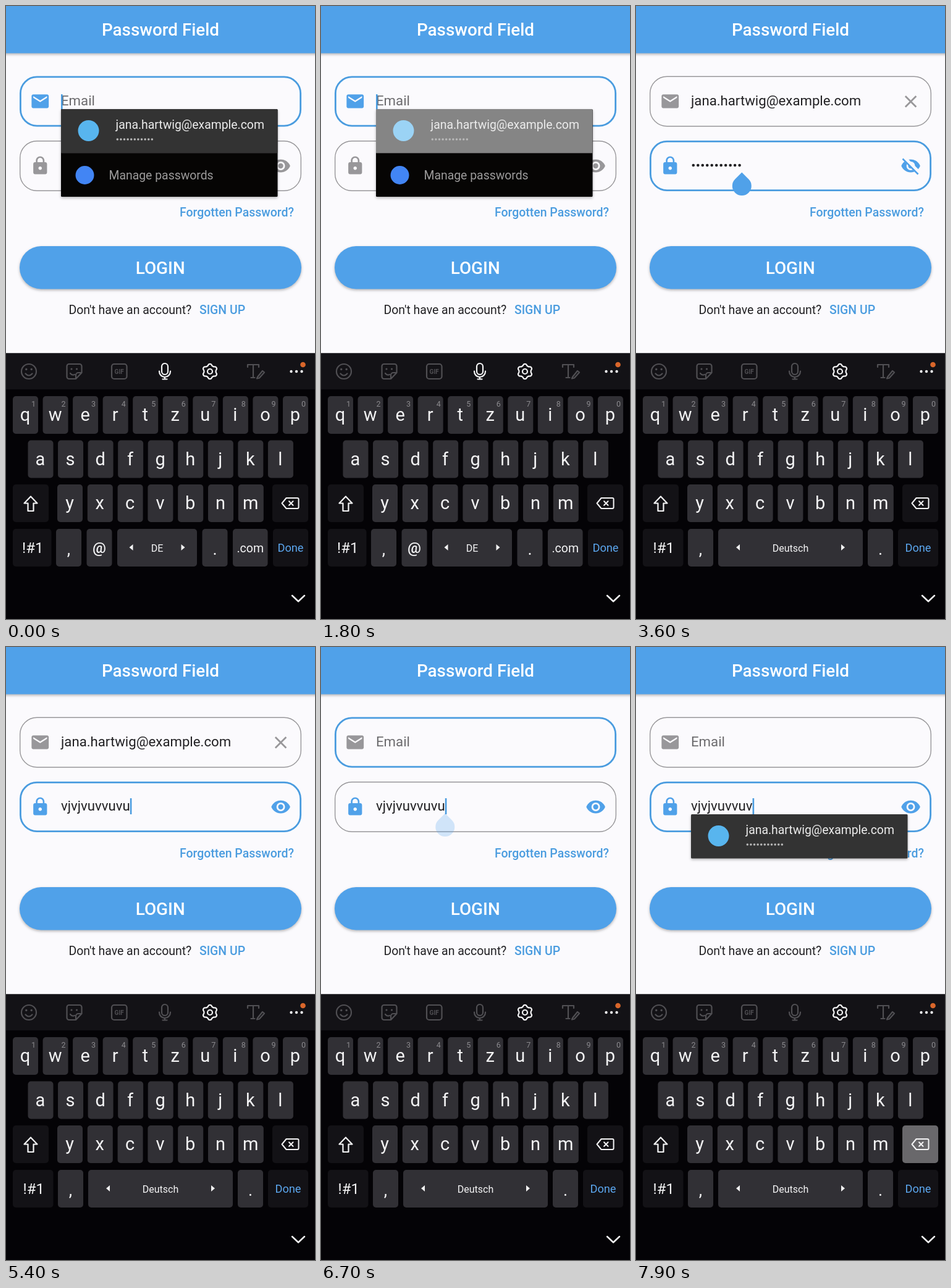
These frames come from a looping animation (500 px wide and 993 px high, 8000 ms). An HTML page:

```html
<!DOCTYPE html>
<html lang="en">
<head>
<meta charset="utf-8">
<title>Password Field</title>
<style>
html, body { margin: 0; width: 100%; height: 100%; overflow: hidden; background: #fbfafd; }
svg { display: block; font-family: Roboto, "Noto Sans", sans-serif; }
text { white-space: pre; }
.med { font-weight: 500; }
.mid { text-anchor: middle; }
.line { fill: none; stroke-linecap: round; stroke-linejoin: round; }
</style>
</head>
<body>
<svg id="stage" width="500" height="993" viewBox="0 0 500 993"></svg>
<script>
const LOOP = 8000, STEP = 100;
const BLUE = '#50a1e9', GREY = '#98979a', KEY = '#313035', DARK_KEY = '#131216', DIM = '#504f53', WHITE = '#f4f4f5';
const USER = 'jana.hartwig@example.com', SECRET = 'vjvjvuvvuvu';
const LEFT = 89, DOT = 7.48;

const ICONS = {
  mail: 'M20 4H4c-1.1 0-2 .9-2 2v12c0 1.1.9 2 2 2h16c1.1 0 2-.9 2-2V6c0-1.1-.9-2-2-2zm0 4l-8 5-8-5V6l8 5 8-5v2z',
  lock: 'M18 8h-1V6c0-2.76-2.24-5-5-5S7 3.24 7 6v2H6c-1.1 0-2 .9-2 2v10c0 1.1.9 2 2 2h12c1.1 0 2-.9 2-2V10c0-1.1-.9-2-2-2zm-6 9c-1.1 0-2-.9-2-2s.9-2 2-2 2 .9 2 2-.9 2-2 2zm3.1-9H8.9V6a3.1 3.1 0 0 1 6.2 0v2z',
  close: 'M19 6.41L17.59 5 12 10.59 6.41 5 5 6.41 10.59 12 5 17.59 6.41 19 12 13.41 17.59 19 19 17.59 13.41 12z',
  eye: 'M12 4.5C7 4.5 2.73 7.61 1 12c1.73 4.39 6 7.5 11 7.5s9.27-3.11 11-7.5c-1.73-4.39-6-7.5-11-7.5zM12 17a5 5 0 1 1 0-10 5 5 0 0 1 0 10zm0-8a3 3 0 1 0 0 6 3 3 0 0 0 0-6z',
};

// Markup helpers
const rect = (x, y, w, h, r, fill, more = '') =>
  `<rect x="${x}" y="${y}" width="${w}" height="${h}" rx="${r}" fill="${fill}" ${more}/>`;
const circle = (x, y, r, fill, more = '') =>
  `<circle cx="${x}" cy="${y}" r="${r}" fill="${fill}" ${more}/>`;
const text = (x, y, size, fill, str, cls = '', more = '') =>
  `<text x="${x}" y="${y}" font-size="${size}" fill="${fill}" class="${cls}" ${more}>${str}</text>`;
const line = (d, color, width) =>
  `<path class="line" d="${d}" stroke="${color}" stroke-width="${width}"/>`;
const icon = (id, name, x, y) =>
  `<path id="${id}" d="${ICONS[name]}" transform="translate(${x} ${y}) scale(1.389)" fill="${GREY}"/>`;
const dots = (n, x, y, gap, r, fill) =>
  Array.from({ length: n }, (_, i) => circle(x + i * gap, y, r, fill)).join('');
const field = (id, y) => `<rect id="${id}Box" data-y="${y}" fill="none"/>`;

function gear(x, y) {
  let d = '';
  for (let i = 0; i < 72; i++) {
    const a = i * Math.PI / 36, r = 10.8 - 1.4 * Math.tanh(1.5 * Math.cos(6 * a));
    d += (i ? 'L' : 'M') + (x + r * Math.cos(a)).toFixed(1) + ' ' + (y + r * Math.sin(a)).toFixed(1);
  }
  return line(d + 'z', WHITE, 2.2) + circle(x, y, 4, 'none', `stroke="${WHITE}" stroke-width="2.2"`);
}

function toolbar() {
  return rect(0, 562.5, 500, 58.5, 0, DARK_KEY) +
    line('M49 592a12 12 0 1 1-24 0a12 12 0 1 1 24 0M31.5 595.5q5.5 6 11 0', DIM, 2.2) +
    circle(32.8, 588.5, 1.7, DIM) + circle(41.2, 588.5, 1.7, DIM) +
    line('M113 604H102a3.5 3.5 0 0 1-3.5-3.5V583.5a3.5 3.5 0 0 1 3.5-3.5H119a3.5 3.5 0 0 1 3.5 3.5V594zM113 604V598a4 4 0 0 1 4-4H122.5M104 595q3 4 7 2', DIM, 2.2) +
    circle(106, 588, 1.6, DIM) + circle(114.5, 588, 1.6, DIM) +
    rect(171, 580, 24.5, 24, 4, 'none', `stroke="${DIM}" stroke-width="2.2"`) +
    text(183.2, 595.7, 10, DIM, 'GIF', 'mid', 'font-weight="700"') +
    '<g id="mic" class="line" stroke-width="2.2"><rect x="252" y="579" width="10" height="18" rx="5"/><path d="M248 591.5v.5a9 9 0 0 0 18 0v-.5M257 601v3.5M253.5 604.5h7"/></g>' +
    gear(330, 592) +
    line('M391 585v-4h18v4M400 581v21M396.5 602h6M407 601l8-10 3 2.5-8 9-4 1z', DIM, 2.2) +
    dots(3, 461.5, 592, 8.5, 2.2, WHITE) + circle(480.5, 581, 4.3, '#d9662a');
}

const key = (x, y, w, fill = KEY, id = '') => rect(x, y, w, 61, 5, fill, id && `id="${id}"`);

function letters(str, x0, y, gap, numbers) {
  return [...str].map((c, i) => {
    const x = x0 + i * gap;
    return key(x, y, 41) + text(x + 20, y + 40, 29, WHITE, c, 'mid') +
      (numbers ? text(x + 33.5, y + 17, 12.5, '#8b8a8e', (i + 1) % 10, 'mid') : '');
  }).join('');
}

function spaceKey(x, w, label, reach) {
  const c = x + w / 2;
  return key(x, 847, w) + text(c, 883.5, 16, WHITE, label, 'mid') +
    `<path d="M${c - reach} 872v10l-6-5zM${c + reach} 872v10l6-5z" fill="${WHITE}"/>`;
}

function bottomRow(id, symW, comma, space, dot, doneX, extra) {
  return `<g id="${id}">` + key(11, 847, symW, DARK_KEY) + text(12 + symW / 2, 886, 24, WHITE, '!#1', 'mid') +
    key(comma, 847, 41) + text(comma + 20.5, 889, 27, WHITE, ',', 'mid') + space +
    key(dot, 847, 41) + text(dot + 20.5, 889, 27, WHITE, '.', 'mid') + extra +
    key(doneX, 847, 489 - doneX, DARK_KEY) + text((doneX + 489) / 2, 884, 18.2, '#5ba6ee', 'Done', 'mid') + '</g>';
}

function keyboard() {
  return '<g id="keyboard">' + rect(0, 562.5, 500, 431, 0, '#040306') + toolbar() +
    letters('qwertzuiop', 11, 632, 48.55, true) +
    letters('asdfghjkl', 35.5, 703.5, 48.55) +
    letters('yxcvbnm', 83, 775, 48.8) +
    key(11, 775, 58, DARK_KEY) + line('M40 794.5L29.5 805.5H35.5V818H44.5V805.5H50.5z', WHITE, 2.2) +
    key(431, 775, 58, DARK_KEY, 'erase') +
    line('M453.5 797H471.5a2 2 0 0 1 2 2V812a2 2 0 0 1-2 2H453.5L446.5 805.5zM458 802.3l6.5 6.5M464.5 802.3l-6.5 6.5', WHITE, 2) +
    bottomRow('mailKeys', 62.5, 81, spaceKey(180, 129, 'DE', 39), 317.5, 432,
      key(130.5, 847, 41) + text(151, 885.5, 24.5, WHITE, '@', 'mid med') +
      key(367, 847, 56.5) + text(395.2, 885, 19.5, WHITE, '.com', 'mid')) +
    bottomRow('textKeys', 65.5, 84, spaceKey(133, 234, 'Deutsch', 82), 375, 424, '') +
    line('M463 955l10 9.5 10-9.5', WHITE, 2.5) + '</g>';
}

function popup() {
  return '<g id="popup"><g id="manage">' +
    rect(89, 167, 350.5, 142, 1.5, '#060504', 'filter="url(#soft)"') +
    circle(127.5, 274, 15, '#4285f4') + text(166.5, 281, 19.4, '#9c9b9b', 'Manage passwords') + '</g>' +
    rect(89, 167, 350.5, 71.5, 1.5, '#333333', 'id="row"') +
    circle(133.5, 202, 17, '#58b5ee') +
    '<g clip-path="url(#rowClip)">' + rect(89, 167, 350.5, 71.5, 0, '#fff', 'id="flood"') +
    circle(265, 203, 10, '#fff', 'id="ripple"') + '</g>' +
    text(177.5, 199, 19.4, '#ececec', USER) + dots(11, 180.3, 216, 5.6, 1.8, '#b9b9b9') + '</g>';
}

const stage = document.getElementById('stage');
stage.innerHTML = `<defs>
  <filter id="soft" x="-10%" y="-20%" width="120%" height="150%" color-interpolation-filters="sRGB">
    <feDropShadow dx="0" dy="2" stdDeviation="2" flood-opacity=".28"/></filter>
  <clipPath id="rowClip"><rect x="89" y="167" width="350.5" height="71.5"/></clipPath></defs>` +
  rect(0, 0, 500, 993, 0, '#fbfafd') +
  rect(-60, -20, 620, 96.5, 0, BLUE, 'filter="url(#soft)"') +
  text(250, 47.5, 27.8, '#fff', 'Password Field', 'med mid') +
  field('mail', 114) + field('pass', 218.5) +
  icon('mailIcon', 'mail', 38.6, 137.7) + icon('passIcon', 'lock', 38.6, 242) +
  text(LEFT, 161, 22.2, '#6c6b6e', 'Email', '', 'id="mailText"') +
  text(LEFT, 265, 22.2, '#212023', 'Password', '', 'id="passText"') +
  `<g id="bullets">${dots(11, 92.8, 258, DOT, 2.3, '#212023')}</g>` +
  circle(444.5, 154.5, 1, '#000', 'id="mailSplash"') + circle(444.5, 259, 1, '#000', 'id="passSplash"') +
  icon('clear', 'close', 427.9, 138) +
  icon('eyeIcon', 'eye', 427.9, 242.3) +
  `<g id="slash"><path d="M433 245.5L458.5 271" stroke="#fbfafd" stroke-width="7"/><path d="M431.5 247.5L456.5 272.5" stroke="${BLUE}" stroke-width="2.6"/></g>` +
  text(281, 340.5, 19.44, '#4a9cdf', 'Forgotten Password?', 'med') +
  rect(22, 389, 456, 69.5, 34.7, BLUE, 'filter="url(#soft)"') +
  text(249.7, 434, 27.8, '#fff', 'LOGIN', 'med mid') +
  text(101.4, 498.7, 19.44, '#212023', "Don't have an account?") +
  text(312.9, 498.7, 19.44, '#4a9cdf', 'SIGN UP', 'med') +
  rect(0, 0, 2.6, 26, 0, '#4a9cdf', 'id="caret"') +
  `<path id="handle" d="M0 0L10.96 10.96A15.5 15.5 0 1 1-10.96 10.96z" fill="${BLUE}"/>` +
  popup() + rect(0, 935, 500, 58, 0, '#040306') + keyboard();

const el = {};
stage.querySelectorAll('[id]').forEach(e => el[e.id] = e);
const set = (id, attrs) => Object.entries(attrs).forEach(([k, v]) => el[id].setAttribute(k, v));
const show = (id, on) => el[id].style.display = on ? '' : 'none';

// Timing helpers: held values and clamped ramps
const hold = (t, table) => table.reduce((v, [from, next]) => t >= from ? next : v, table[0][1]);
const ramp = (t, from, to) => Math.min(1, Math.max(0, (t - from) / (to - from)));
const between = (t, a, b) => t >= a && t < b;

const TRACK = {
  mail: [[0, ''], [1900, USER], [5900, '']],
  pass: [[0, ''], [1900, SECRET], [7800, SECRET.slice(0, -1)]],
  focus: [[0, 'mail'], [2400, 'pass'], [5900, 'mail'], [6700, 'pass']],
  border: [[0, 'mail'], [2500, 'pass'], [6000, 'mail'], [6800, 'pass']],
  keys: [[0, 'mail'], [2400, 'pass'], [6100, 'mail'], [6600, 'pass']],
  handle: [[0, 0], [2500, 1], [4000, 0], [6700, .25], [6800, 1], [7800, 0]],
  blink: [[0, 300], [2400, 50], [5900, 100], [6700, 300], [7800, 200]],
};

function drawBox(name, active) {
  const box = el[name + 'Box'], w = active ? 2.8 : 1.4;
  set(name + 'Box', {
    x: 22 + w / 2, y: +box.dataset.y - .5 + w / 2, width: 456 - w, height: 82 - w, rx: 28 - w / 2,
    stroke: active ? '#4a9cdf' : GREY, 'stroke-width': w,
  });
}

function drawText(id, value, hint) {
  el[id].textContent = value || hint;
  set(id, { fill: value ? '#212023' : '#6c6b6e' });
}

function drawSplash(id, t, starts, size) {
  const from = starts.find(s => between(t, s, s + 500));
  const p = from === undefined ? 1 : ramp(t, from - 100, from + 500);
  set(id, { r: size * Math.min(1, .4 + p), opacity: .12 * (1 - p) });
}

function draw(t) {
  const s = {};
  for (const name in TRACK) s[name] = hold(t, TRACK[name]);
  const hidden = between(t, 3000, 4000), onPass = s.focus === 'pass';

  drawBox('mail', s.border === 'mail');
  drawBox('pass', s.border === 'pass');
  set('mailIcon', { fill: onPass ? GREY : BLUE });
  set('passIcon', { fill: onPass ? BLUE : GREY });
  set('eyeIcon', { fill: onPass ? BLUE : GREY });
  drawText('mailText', s.mail, 'Email');
  drawText('passText', s.pass, 'Password');
  show('passText', !hidden);
  show('bullets', hidden);
  show('slash', hidden);
  show('clear', s.mail);
  drawSplash('passSplash', t, [3000, 4000], 48);
  drawSplash('mailSplash', t, [5900], 38);

  const value = onPass ? s.pass : s.mail;
  const length = !value ? 0 : hidden ? DOT * 11 : el[onPass ? 'passText' : 'mailText'].getComputedTextLength();
  set('caret', { x: LEFT + length, y: onPass ? 245 : 143 });
  show('caret', (t + s.blink) % 1000 < 500);
  set('handle', { transform: `translate(${LEFT + length} 269.5)`, opacity: s.handle });

  const late = t >= 7900;
  show('popup', t < 1900 || late);
  show('manage', !late);
  set('popup', { transform: `translate(0 ${late ? 104 : 0})` });
  set('row', { filter: late ? 'url(#soft)' : 'none' });
  const press = ramp(t, 800, 1100), pressed = between(t, 800, 1900);
  set('flood', { opacity: pressed ? .06 + .34 * press : 0 });
  set('ripple', { r: 106 + 160 * press, opacity: pressed ? .05 * (1 - press) : 0 });

  const mailKeys = s.keys === 'mail';
  show('mailKeys', mailKeys);
  show('textKeys', !mailKeys);
  set('mic', { stroke: mailKeys ? WHITE : DIM });
  set('erase', { fill: t >= 7800 ? '#69686b' : DARK_KEY });
  const drop = ramp(t, 2000, 2200) - ramp(t, 2400, 2600);
  set('keyboard', { transform: `translate(0 ${431 * drop})` });
}

const start = performance.now();
function tick() {
  const t = (performance.now() - start) % LOOP;
  draw(Math.floor(t / STEP) * STEP);
  requestAnimationFrame(tick);
}
tick();
</script>
</body>
</html>
```
